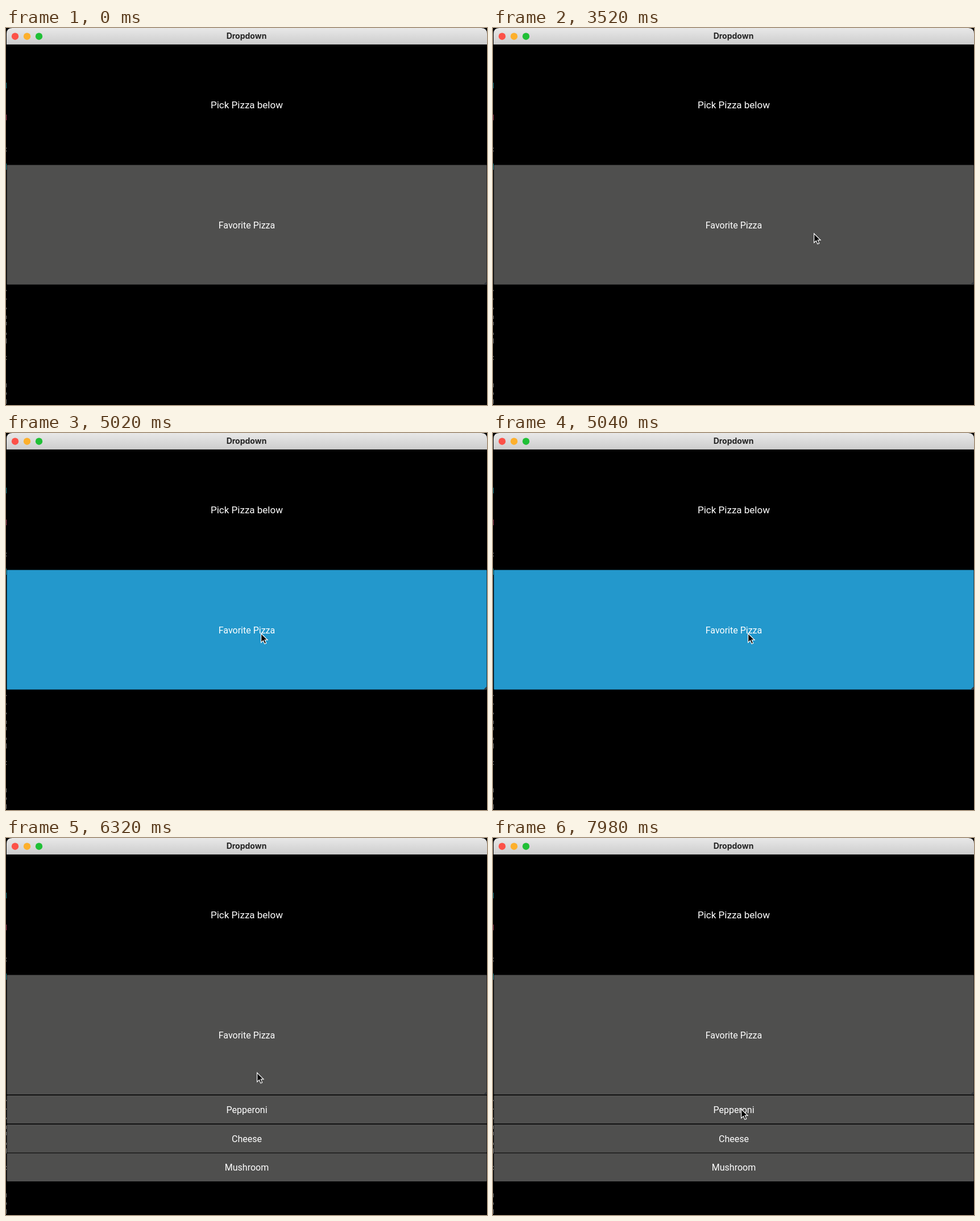
These frames come from a looping animation (846 px wide and 662 px high, 8 s). An HTML page:

```html
<!DOCTYPE html>
<html lang="en">
<head>
<meta charset="utf-8">
<title>Dropdown</title>
<style>
  html, body { margin: 0; width: 100%; height: 100%; overflow: hidden; background: #000; }
  svg { display: block; width: 846px; height: 662px; }
  text { font: 16px Roboto, sans-serif; fill: #fff; text-anchor: middle; }
  .heading { font-size: 17px; }
  .title { font: 700 14px Inter, sans-serif; fill: #222; }
  .surface { fill: #4f4f4e; }
  .button { animation: press 8s step-end infinite; }
  .menu { visibility: hidden; animation: open 8s step-end infinite; }
  .cursor { animation: move 8s linear infinite; }

  @keyframes press {
    0%, 63.25% { fill: #4f4f4e; }
    62.75% { fill: #2398cc; }
  }
  @keyframes open {
    0% { visibility: hidden; }
    63.25%, 100% { visibility: visible; }
  }
  @keyframes move {
    0%, 29.25% { transform: translate(860px, 362px); }
    35% { transform: translate(690px, 362px); }
    40.5% { transform: translate(580px, 361px); }
    44%, 45.5% { transform: translate(564px, 360px); }
    51% { transform: translate(490px, 357px); }
    57%, 73.5% { transform: translate(448px, 351px); }
    79% { transform: translate(441px, 411px); }
    82.5% { transform: translate(437px, 470px); }
    87%, 100% { transform: translate(436px, 475px); }
  }
</style>
</head>
<body>
<svg viewBox="0 0 846 662">
  <defs>
    <linearGradient id="bar" x2="0" y2="1">
      <stop stop-color="#e8e8e8"/>
      <stop offset="1" stop-color="#cdcdcd"/>
    </linearGradient>
  </defs>
  <rect width="846" height="662"/>

  <!-- slivers of the window behind -->
  <g shape-rendering="crispEdges">
    <path d="M.5 96v10M.5 238v11" stroke="#16808c"/>
    <path d="M.5 152v10" stroke="#a8405c"/>
    <path d="M.5 210v2m0 3v2M.5 460v2m0 13v2m0 14v3m0 11v6m0 5v6m0 13v4m0 6v9m0 22v2m0 3v2m0 41v7m0 9v4m0 8v8" stroke="#777"/>
  </g>

  <path d="M1 29V10Q1 0 11 0H836Q846 0 846 10V29Z" fill="url(#bar)"/>
  <path d="M1 28.5H846" stroke="#bdbdbd"/>
  <circle cx="16" cy="14.7" r="6.2" fill="#fc5148"/>
  <circle cx="37" cy="14.7" r="6.2" fill="#fdb02c"/>
  <circle cx="58" cy="14.7" r="6.2" fill="#20c036"/>
  <text class="title" x="423" y="19">Dropdown</text>

  <text class="heading" x="423.5" y="141">Pick Pizza below</text>
  <rect class="surface button" x="1.5" y="240.5" width="844" height="210" rx="1"/>
  <path d="M840 450.5L845.5 445V450.5Z" fill="#34383e"/>
  <text x="423.5" y="352">Favorite Pizza</text>

  <g class="menu">
    <rect class="surface" x="1.5" y="452" width="844" height="49.5" rx="1"/>
    <rect class="surface" x="1.5" y="503" width="844" height="49.5" rx="1"/>
    <rect class="surface" x="1.5" y="553.5" width="844" height="49.5" rx="1"/>
    <text x="423.5" y="483">Pepperoni</text>
    <text x="423.5" y="533.5">Cheese</text>
    <text x="423.5" y="584.3">Mushroom</text>
  </g>

  <path class="cursor" d="M.6 1V17L4.4 13.5L6.9 19.3L9.7 18.1L7.2 12.4H12Z" stroke="#fff" stroke-width="1.2"/>
</svg>
</body>
</html>
```
